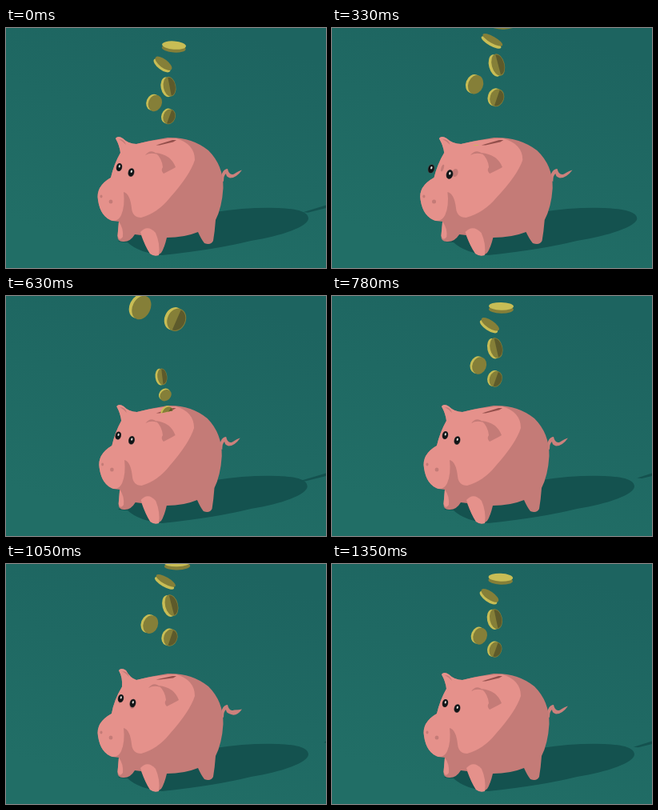
Recreate the animation shown at these times as an HTML page with a canvas. Size 400 by 300 pixels, loop 1.38 s.

```html
<!DOCTYPE html>
<html lang="en">
<head>
<meta charset="utf-8">
<title>Piggy bank</title>
<style>
html, body { margin: 0; width: 100%; height: 100%; overflow: hidden; }
canvas { display: block; width: 400px; height: 300px; }
</style>
</head>
<body>
<canvas width="400" height="300"></canvas>
<script>
const ctx = document.querySelector('canvas').getContext('2d');
const LOOP = 1380;
const PINK = '#e5918b', ROSE = '#c47b77', SHADOW = '#14524f';
const GOLD = '#c8bd55', OLIVE = '#857f38', UMBER = '#5d5a2b';

// Each key: [time, ...values]
const phaseKeys = [[0, 0], [150, .45], [330, .84], [480, 1], [780, 1.95], [1050, 2.87], [1350, 3.975], [LOOP, 4]];
const poseKeys = [ // body width, head lift, slot opening
  [0, 1, 0, 0], [150, 1.055, 0, 1], [240, 1.1, 0, .6], [330, 1.055, 0, .1], [480, .955, 0, 0],
  [780, 1, 0, 0], [1050, 1, 1, 0], [1350, 1, 0, 0], [LOOP, 1, 0, 0]];
const eyeKeys = [ // far x, y, near x, y
  [0, 141.5, 174, 156.5, 180.5], [150, 138, 174, 150, 182], [330, 124, 176, 147, 183],
  [480, 139, 175, 157.5, 180], [780, 141.5, 174, 156.5, 180.5], [1050, 143.5, 168, 158.5, 174],
  [1350, 141.5, 174, 156.5, 180.5], [LOOP, 141.5, 174, 156.5, 180.5]];

const coins = [
  { x: 203, drift: -10, bend: 12, y: 110, speed: 142, r: 9.7, angle: 110, turn: 40, flat: .78, open: 0, dark: true },
  { x: 185, drift: 48, bend: 28, y: 93, speed: 139, r: 10.5, angle: 112, turn: 40, flat: .8, open: .15 },
  { x: 203, drift: -15, bend: 23, y: 73, speed: 163, r: 12.5, angle: 79, turn: 120, flat: .62, open: .3, dark: true },
  { x: 196, drift: -17, bend: 48, y: 45, speed: 176, r: 12.5, angle: 37, turn: 250, flat: .42, open: .8 },
  { x: 210, drift: -32, bend: -3, y: 23, speed: 175, r: 15, angle: 4, turn: 200, flat: .34, open: .5, dark: true }];

function track(keys, t, ease = u => u) {
  const i = keys.findIndex(k => k[0] > t);
  const a = keys[i - 1], b = keys[i];
  const u = ease((t - a[0]) / (b[0] - a[0]));
  return a.slice(1).map((v, n) => v + (b[n + 1] - v) * u);
}
const smooth = u => u * u * (3 - 2 * u);

function fill(path, color) {
  ctx.fillStyle = color;
  ctx.fill(new Path2D(path));
}

function oval(x, y, rx, ry, color, angle = 0) {
  ctx.fillStyle = color;
  ctx.beginPath();
  ctx.ellipse(x, y, rx, ry, angle, 0, 7);
  ctx.fill();
}

function drawGround(s, width) {
  const g = ctx.createLinearGradient(280, 0, 170, 300);
  g.addColorStop(0, '#1d6460');
  g.addColorStop(1, '#216e66');
  ctx.fillStyle = g;
  ctx.fillRect(0, 0, 400, 300);
  const edge = 378 + 60 * (width - 1);
  fill(`M140 267Q200 232 262 230Q300 224 340 225C366 226 ${edge} 230 ${edge} 238C${edge} 248 345 260 306 266
    Q262 277 195 284Q166 281 152 268Z`, SHADOW);

  const tail = s > .65 ? s - 1 : s;
  const x = Math.max(368, 372 - 200 * tail);
  if (x < 400) {
    const y = 230 - (x - 372) * .27;
    fill(`M${x} ${y}L400 221.5V225L${x + 6} ${y + .5}Z`, SHADOW);
  }
}

function drawPig(width, lift, open) {
  const ex = 4 * lift, ey = -5 * lift;
  const ear = `${137 + ex} ${138 + ey}Q${140 + ex} ${134 + ey} ${146 + ex} ${138 + ey}Q${153 + ex / 2} ${145 + ey / 2} 163 145`;
  const face = `Q118 236 115 215Q112 198 ${131 + ex / 4} 187Q135 170 ${143 + ex / 2} ${156 + ey / 2}Q${142 + ex} ${147 + ey} ${137 + ex} ${138 + ey}Z`;
  ctx.save();
  ctx.translate(194, 0);
  ctx.scale(width, 1);
  ctx.translate(-194, 0);

  const tip = 177.5 + 4 * lift;
  fill(`M268 190Q270 176 277 176Q279 185 285 182.5Q291 ${tip + 1} 295 ${tip}Q288 ${tip + 10} 280 187.5Q275 186 275 182Q272 184 272 192Z`, '#cc817c');

  fill(`M${ear}Q183 140 202 137Q232 136 253 153Q272 172 271.5 200Q270 224 262 240
    Q261 254 259 266Q256 272 248 269Q244 264 240 255Q223 262 201 262
    Q198 275 194 281Q188 287 180 282Q174 273 169 259L161 258Q155 268 146 267Q139 267 139.5 259L141 242L133 241${face}`, ROSE);
  fill(`M${ear}Q185 139 213 138Q236 145 236 165Q230 184 205 212Q190 231 169 237
    Q158 237 157 225Q155 207 147 205Q149 222 144 234Q140 242 133 241${face}`, PINK);
  fill('M168 255Q177 245 187 256Q193 270 191 284Q185 286 180 282Q174 273 168 255Z', PINK);
  fill('M141 242Q147 250 146 261Q142 267 139.5 260Z', PINK);

  ctx.save();
  ctx.translate(4 * lift, -4 * lift);
  fill('M174 159Q181 150 189 158Q181 155 174 159Z', ROSE);
  fill('M187 156Q206 158 212 174Q209 176 197 182Q193 178 196 174Q195 163 187 156Z', ROSE);
  ctx.restore();
  fill(`M${141 + ex} ${139 + ey}Q${148 + ex} ${139 + ey} ${150 + ex} ${146 + ey}Q${147 + ex} ${142 + ey} ${141 + ex} ${139 + ey}Z`, ROSE);

  // Eye sockets, seen when the eyes slide off them
  oval(141 + ex / 2, 175 + ey, 1.5, 4.5, ROSE, .3);
  oval(156 + ex / 2, 181 + ey, 3.4, 5, ROSE, .2);

  const slotY = 146.5 - 2 * lift;
  fill(`M${187.5 - 3 * open} ${slotY}L${208 + open} ${140 - open}L${213 + 3 * open} 140L${209 + 5 * open} ${142.5 + open}L192 ${slotY}Z`, '#94504c');
  oval(119, 210.5, 1.5, 2.1, ROSE);
  oval(131, 217, 2.4, 2.5, ROSE);
  ctx.restore();
}

function drawEye(x, y, size) {
  ctx.save();
  ctx.translate(x, y);
  ctx.rotate(.25);
  ctx.scale(size, size);
  oval(0, 0, 3.9, 5.4, '#4a4140');
  oval(0, 0, 3.4, 4.9, '#111416');
  oval(0, -1.2, 1.1, 1.7, '#e0ddd8');
  ctx.restore();
}

function drawCoin(c, s) {
  const r = c.r - 9.5 * s;
  const x = c.x + c.drift * s + c.bend * s * s;
  const y = c.y + c.speed * s - 25 * s * s;
  if (y < -25 || y > 158) return;
  const minor = r * Math.min(.85, Math.max(.3, c.flat + c.open * s));
  const thick = r * .26;
  const level = c.angle < 20 && s < .2;
  ctx.save();
  ctx.translate(x, y);
  ctx.rotate((c.angle + c.turn * s * (s + .35)) * Math.PI / 180);
  oval(0, thick / 2, r, minor, level ? OLIVE : GOLD);
  oval(0, -thick / 2, r, minor, level ? GOLD : OLIVE);
  if (c.dark && !level) {
    ctx.beginPath();
    ctx.rect(-r, -2 * r, 2 * r, 2 * r - thick / 2);
    ctx.clip();
    oval(0, -thick / 2, r * .92, minor * .92, UMBER);
  }
  ctx.restore();
}

function draw(t) {
  const s = track(phaseKeys, t)[0] % 1;
  const [width, lift, open] = track(poseKeys, t, smooth);
  const [farX, farY, nearX, nearY] = track(eyeKeys, t, smooth);
  const eyeSize = 1 + Math.max(0, width - 1) * 2;
  drawGround(s, width);
  drawPig(width, lift, open);
  drawEye(farX, farY, eyeSize * .95);
  drawEye(nearX, nearY, eyeSize);

  // Coins vanish behind the front edge of the slot
  ctx.save();
  ctx.clip(new Path2D('M0 0H400V142H214L192 147H0Z'));
  for (const c of [...coins].reverse()) {
    drawCoin(c, s);
    drawCoin(c, s - 1);
  }
  ctx.restore();
}

function frame() {
  draw(performance.now() % LOOP);
  requestAnimationFrame(frame);
}
frame();
</script>
</body>
</html>
```
